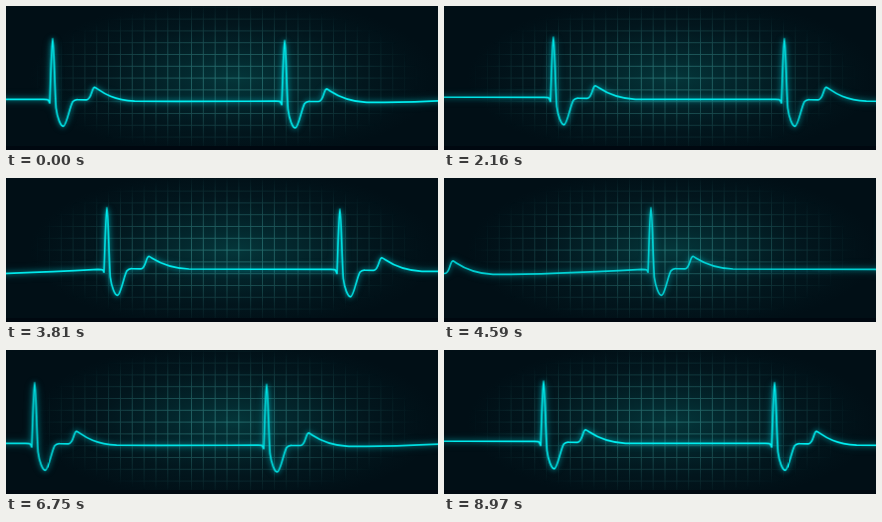
These frames come from a looping animation (432 by 144 pixels, 9 s). An HTML page:

```html
<!DOCTYPE html>
<html lang="en">
<head>
<meta charset="utf-8">
<title>Heartbeat monitor</title>
<style>
  html, body { margin: 0; width: 100%; height: 100%; overflow: hidden; background: #010f16; }
  svg { display: block; width: 432px; height: 144px; }
  #grid { stroke: #4fb5b0; stroke-width: .9; fill: none; }
  #trace {
    fill: none; stroke: #00eef0; stroke-width: 1.7; stroke-linejoin: round;
    filter: drop-shadow(0 0 2.4px rgba(0, 225, 235, .7)) drop-shadow(0 0 5px rgba(0, 200, 210, .3));
  }
  #strip { animation: scroll 9s steps(300) infinite; }
  #glow { animation: pulse 1.8s ease-in-out infinite; }
  @keyframes scroll {
    from { transform: translateX(-417.4px); }
    to { transform: translateX(806.6px); }
  }
  @keyframes pulse { 50% { opacity: .86; } }
</style>
</head>
<body>
<svg viewBox="0 0 432 144">
  <defs>
    <radialGradient id="light" gradientUnits="userSpaceOnUse" cx="0" cy="0" r="1"
        gradientTransform="translate(228 72) scale(205 82)">
      <stop offset="0" stop-color="#04363a"/>
      <stop offset=".3" stop-color="#03262c"/>
      <stop offset=".65" stop-color="#02161d"/>
      <stop offset="1" stop-color="#010f16"/>
    </radialGradient>
    <radialGradient id="fade" gradientUnits="userSpaceOnUse" cx="0" cy="0" r="1"
        gradientTransform="translate(220 72) scale(195 76)">
      <stop offset="0" stop-color="#fff" stop-opacity=".5"/>
      <stop offset=".5" stop-color="#fff" stop-opacity=".31"/>
      <stop offset="1" stop-color="#fff" stop-opacity="0"/>
    </radialGradient>
    <mask id="vignette" maskUnits="userSpaceOnUse" x="0" y="0" width="432" height="144">
      <rect width="432" height="144" fill="url(#fade)"/>
    </mask>
  </defs>
  <rect width="432" height="144" fill="url(#light)"/>
  <g mask="url(#vignette)"><path id="grid"/></g>
  <rect y="140" width="432" height="4" fill="#000810"/>
  <g id="glow"><g id="strip"><path id="trace"/></g></g>
</svg>
<script>
  const COLUMN = 11.84, ROW = 11.8, STRIP = 936;

  // Place, baseline before, baseline after and vertical shift of each beat
  const beats = [
    { x: 0, pre: 91.3, post: 91, dy: -2.9 },
    { x: 233, pre: 91.3, post: 93.3, dy: -1.5 },
    { x: 464, pre: 93.3, post: 95.2, dy: 0 },
    { x: 696, pre: 95, post: 96.4, dy: 1.7 }
  ];

  function beatPath({ x, pre, post, dy }, next) {
    const at = (dx, y) => `${x + dx} ${y + dy} `;
    const flat = (dx, y) => `${x + dx} ${y} `;
    return 'L' + flat(-9, pre) +
      'L' + flat(-5, pre + .3) +
      'Q' + at(-3.8, 94.5) + at(-2.9, 97) +
      'C' + at(-2, 76) + at(-1.1, 32.3) + at(0, 32.3) +
      'C' + at(1.2, 32.3) + at(1.9, 80) + at(3.4, 102) +
      'C' + at(4.7, 112) + at(8, 120.3) + at(10.7, 120.3) +
      'C' + at(13.8, 120) + at(17, 101) + at(20, 95.8) +
      'Q' + at(22, 93.4) + at(25, 93.6) +
      'L' + at(34, 93.8) +
      'C' + at(39, 93.6) + at(39, 81.4) + at(42, 81.2) +
      'C' + at(46, 82.6) + flat(55, post - 1.5) + flat(82, post) +
      'Q' + flat(130, post + .3) + `${next.x - 9} ${next.pre} `;
  }

  const beat = n => {
    const base = beats[(n + 8) % 4];
    return { ...base, x: base.x + Math.floor(n / 4) * STRIP };
  };

  let trace = `M${-STRIP - 9} ${beats[0].pre}`;
  for (let n = -4; n < 4; n++) trace += beatPath(beat(n), beat(n + 1));
  document.getElementById('trace').setAttribute('d', trace);

  let grid = '';
  for (let x = 43.4 - 3 * COLUMN; x < 432; x += COLUMN) grid += `M${x} 0V144`;
  for (let y = 48.5 - 4 * ROW; y < 144; y += ROW) grid += `M0 ${y}H432`;
  document.getElementById('grid').setAttribute('d', grid);
</script>
</body>
</html>
```
